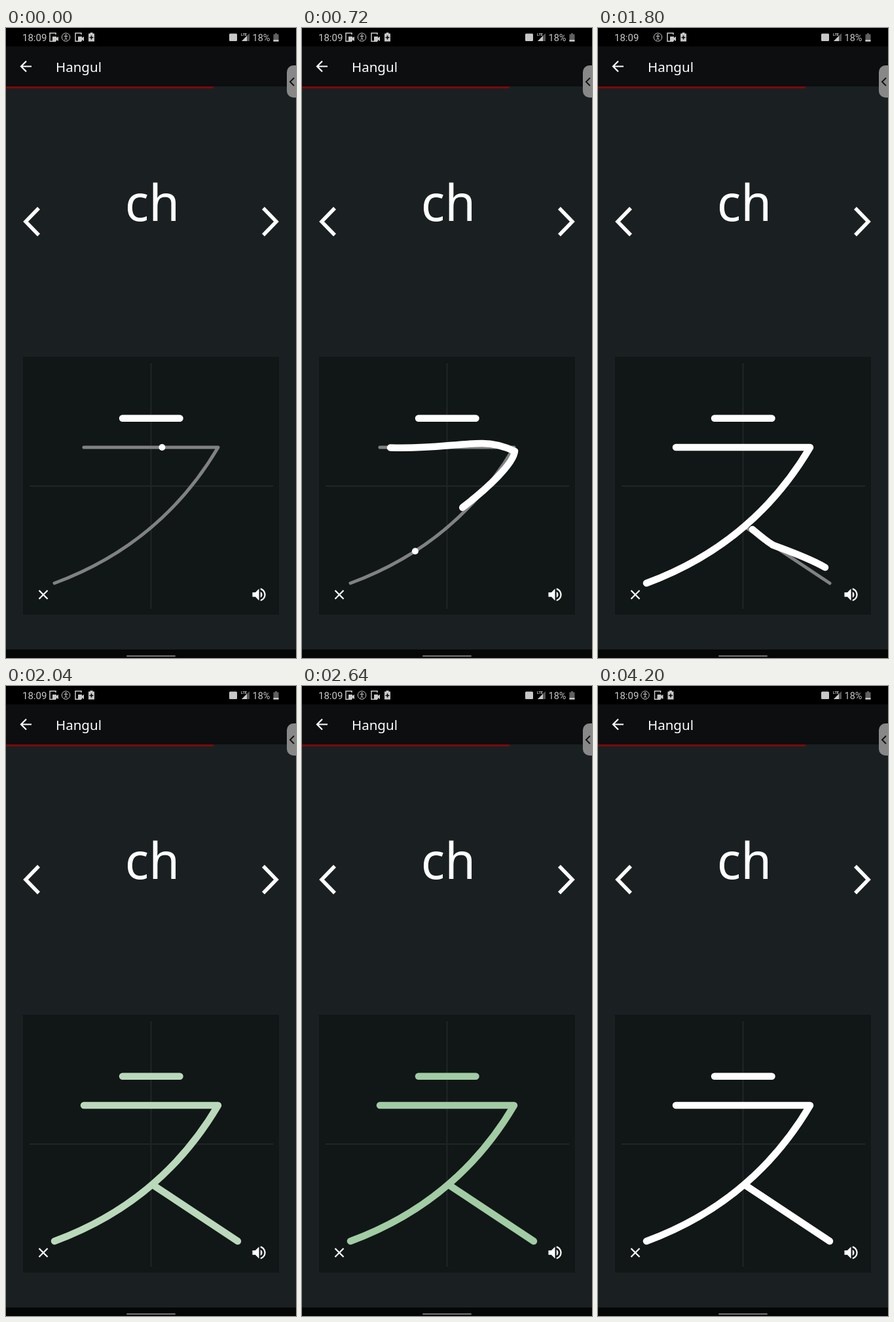
Write an HTML page that moves like this. It is 443x960 px and loops after 4.56 s.

```html
<!DOCTYPE html>
<html lang="en">
<head>
<meta charset="utf-8">
<title>Hangul</title>
<style>
  html, body { margin: 0; width: 100%; height: 100%; overflow: hidden; background: #1a2022; }
  svg { display: block; width: 100vw; height: 100vh; }
  .ui { font-family: "Noto Sans", "Open Sans", sans-serif; font-weight: 500; fill: #fff; }
  .status { font-family: Roboto, sans-serif; fill: #c8c8c8; }
  .line { fill: none; stroke: #fff; }
  .ink { stroke-width: 10.5; stroke-linecap: round; stroke-linejoin: round; }
  .guide { stroke: #808282; stroke-width: 5; stroke-linecap: round; stroke-linejoin: round; }
</style>
</head>
<body>
<svg viewBox="0 0 443 960">
  <defs>
    <g id="cast">
      <path d="M10 3V.8H1V13.2H10" fill="none" stroke="#c8c8c8" stroke-width="1.5"/>
      <path d="M5 6h6v2l3-2v7l-3-2v2H5z" fill="#c8c8c8"/>
    </g>
  </defs>
  <rect width="443" height="960" fill="#1a2022"/>
  <rect width="443" height="89" fill="#0c0e10"/>
  <rect width="443" height="28" fill="#000"/>
  <rect y="947" width="443" height="13" fill="#050707"/>
  <rect x="184" y="956" width="75" height="2" rx="1" fill="#777"/>
  <rect y="89" width="317" height="3" fill="#7e0809"/>

  <g class="status">
    <text x="25" y="19.5" font-size="15">18:09</text>
    <use id="rec" href="#cast" x="66" y="7"/>
    <g id="icons">
      <g fill="none" stroke="#c8c8c8">
        <circle cx="91.5" cy="14" r="6.2"/>
        <path d="M88.5 12.5h6M91.5 12v3l-2 3.5M91.5 15l2 3.5"/>
      </g>
      <circle cx="91.5" cy="10.5" r="1.1"/>
      <use href="#cast" x="105" y="7"/>
      <path d="M128.5 7h4v1.5h2.5V20.5h-9V8.5h2.5z"/>
      <path d="M130.5 11.5v6M127.5 14.5h6" stroke="#000" stroke-width="1.5"/>
    </g>
    <rect x="341" y="8.5" width="12" height="11.5" rx="1.5"/>
    <text x="359" y="11.5" font-size="5.5" font-weight="700">LTE</text>
    <path d="M372 8V20H360z" fill="#555"/>
    <path d="M368 12V20H360z"/>
    <text x="376.5" y="19.5" font-size="14.5">18%</text>
    <path d="M411 8h3v1.5h2.5V20.5h-8V9.5h2.5z" fill="#606060"/>
    <path d="M408.5 18h8v2.5h-8z"/>
  </g>

  <g class="line">
    <path d="M39 58.5H23.5M31 50.5L23 58.5L31 66.5" stroke-width="2.2"/>
    <path d="M50 274.5L30 295L50 315.5M393 274.5L413 295L393 315.5" stroke-width="5.5"/>
  </g>
  <text class="ui" x="76" y="67" font-size="20.5">Hangul</text>
  <text class="ui" x="223.4" y="293.5" font-size="76" text-anchor="middle">ch</text>
  <rect x="429" y="57" width="30" height="49" rx="10" fill="#888"/>
  <path d="M440 76L434 82L440 88" fill="none" stroke="#151515" stroke-width="2"/>

  <rect x="26" y="501" width="391" height="393" fill="#111717"/>
  <path d="M221.5 511V885M36 698H408" stroke="#202626" stroke-width="2"/>

  <path id="guide" class="line guide"/>
  <g id="done" class="line ink"></g>
  <path id="pen" class="line ink"/>
  <circle id="dot" r="5" fill="#fff"/>

  <path class="line" d="M50.5 857L63.5 870M63.5 857L50.5 870" stroke-width="2.2"/>
  <path fill="#fff" transform="translate(373.1 850) scale(1.12)"
    d="M3 9v6h4l5 5V4L7 9H3zm13.5 3c0-1.77-1.02-3.29-2.5-4.03v8.05c1.48-.73 2.5-2.25 2.5-4.02zM14 3.23v2.06c2.89.86 5 3.54 5 6.71s-2.11 5.85-5 6.71v2.06c4.01-.91 7-4.49 7-8.77s-2.99-7.86-7-8.77z"/>
</svg>
<script>
const LOOP = 4560, STEP = 120;
const $ = id => document.getElementById(id);
const ramp = (t, a, b) => Math.min(1, Math.max(0, (t - a) / (b - a)));
const ease = p => (1 - Math.cos(Math.PI * p)) / 2;

const strokes = ["M178 594.7H265.5", "M119 639H324Q237 786 74 846", "M224 760L354 846"];

// Each round: guide stroke, hand-drawn path, dot [start, end], pen [start, px per ms], end of the round.
const rounds = [
  { stroke: 1, hand: "M135 639.5C195 642 235 633 275 633Q300 633 325 645C323 664 284 701 246 730Q205 770 130 815",
    dot: [-582, 1278], pen: [60, 0.471], end: 960 },
  { stroke: 2, hand: "M236 764Q262 786 270 789Q325 809 347 822",
    dot: [831, 3321], pen: [1320, 0.265], end: 1920 }
];

const shapes = strokes.map(d => {
  const p = document.createElementNS("http://www.w3.org/2000/svg", "path");
  p.setAttribute("d", d);
  $("done").append(p);
  return p;
});

function drawRound(t) {
  const r = rounds.find(r => t < r.end);
  const count = r ? r.stroke : strokes.length;
  shapes.forEach((s, i) => s.style.display = i < count ? "" : "none");
  for (const id of ["guide", "pen", "dot"]) $(id).style.display = r ? "" : "none";
  if (!r) return;

  const shape = shapes[r.stroke], pen = $("pen"), dot = $("dot");
  $("guide").setAttribute("d", strokes[r.stroke]);
  const at = shape.getPointAtLength(shape.getTotalLength() * ease(ramp(t, ...r.dot)));
  dot.setAttribute("cx", at.x);
  dot.setAttribute("cy", at.y);

  const drawn = (t - r.pen[0]) * r.pen[1];
  pen.setAttribute("d", r.hand);
  pen.style.strokeDasharray = `${Math.max(0, drawn)} 2000`;
  if (drawn <= 0) pen.style.display = "none";
}

function draw(t) {
  drawRound(t);

  // Success flash: white to green and back.
  const green = ramp(t, 1860, 2220) - ramp(t, 2460, 3000);
  const rgb = [116, 178, 119].map(c => 255 + (c - 255) * green);
  $("done").style.stroke = `rgb(${rgb})`;

  // The recording icon blinks, then leaves and its neighbours close the gap.
  const leave = ramp(t, 3960, 4200);
  const on = t < 960 || (t >= 1920 && t < 2880) || t >= 3720;
  $("rec").style.opacity = on ? 1 - leave : 0;
  $("icons").setAttribute("transform", `translate(${-19.5 * leave} 0)`);
}

function tick() {
  draw(Math.floor(performance.now() % LOOP / STEP) * STEP);
  requestAnimationFrame(tick);
}
tick();
</script>
</body>
</html>
```
